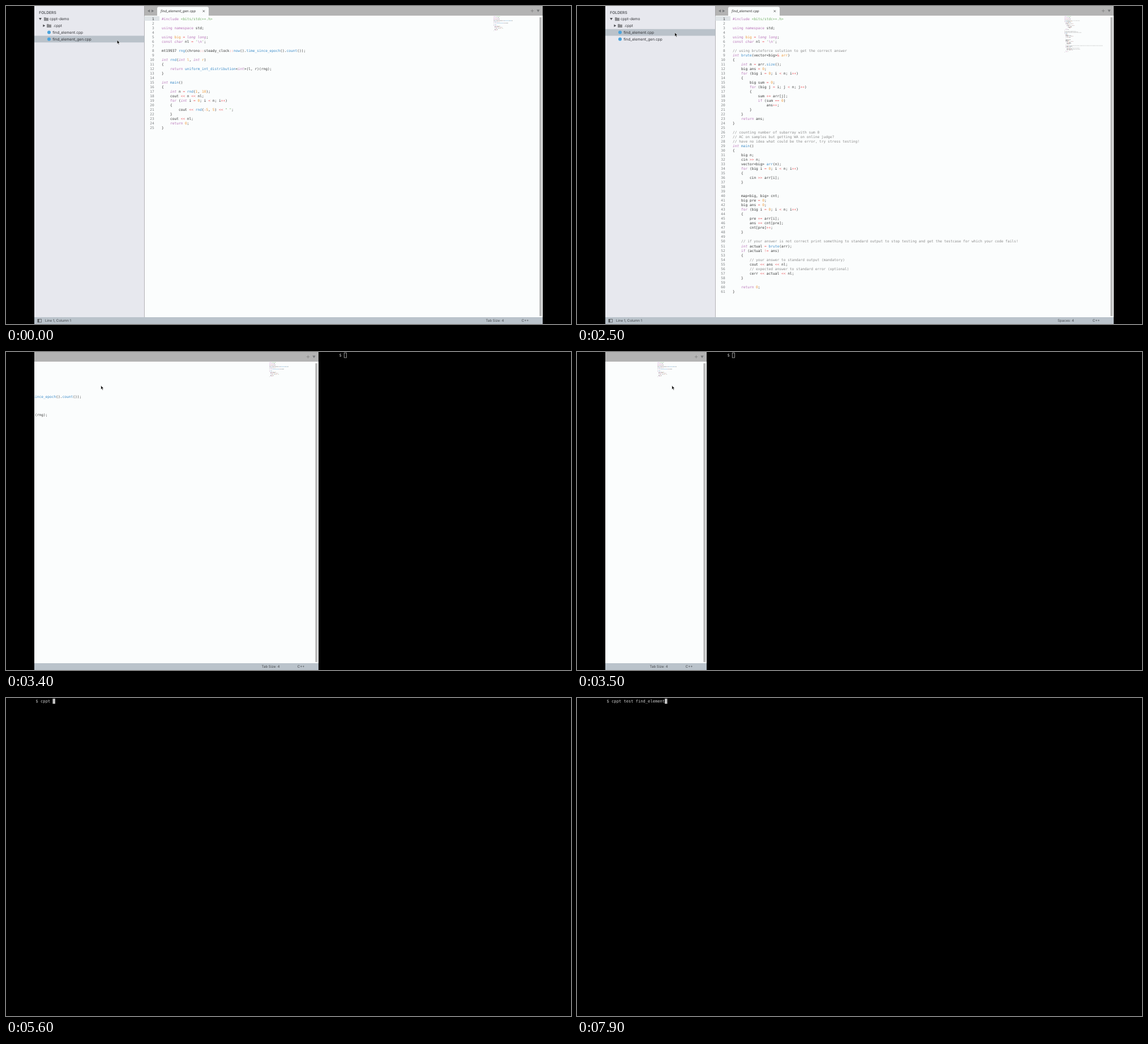
Recreate the animation shown at these times as an HTML page with a canvas. Size 998x561 px, loop 8 s.

```html
<!DOCTYPE html>
<html lang="en">
<head>
<meta charset="utf-8">
<title>Editor and terminal</title>
<style>
html, body { margin: 0; width: 100%; height: 100%; overflow: hidden; background: #000; }
canvas { display: block; width: 998px; height: 561px; }
</style>
</head>
<body>
<canvas id="stage"></canvas>
<script>
const W = 998, H = 561, LOOP = 8000, STEP = 100;
const LEFT = 50, RIGHT = 948, SPACING = 932;
const MONO = '"DejaVu Sans Mono", monospace';
const SANS = 'Inter, sans-serif';
const ADVANCE = 0.602;

const HEAD = String.raw`#include <bits/stdc++.h>

using namespace std;

using big = long long;
const char nl = '\n';

`;

const GEN = HEAD + String.raw`mt19937 rng(chrono::steady_clock::now().time_since_epoch().count());

int rnd(int l, int r)
{
    return uniform_int_distribution<int>(l, r)(rng);
}

int main()
{
    int n = rnd(1, 10);
    cout << n << nl;
    for (int i = 0; i < n; i++)
    {
        cout << rnd(-5, 5) << " ";
    }
    cout << nl;
    return 0;
}`;

const SOLUTION = HEAD + String.raw`// using bruteforce solution to get the correct answer
int brute(vector<big>& arr)
{
    int n = arr.size();
    big ans = 0;
    for (big i = 0; i < n; i++)
    {
        big sum = 0;
        for (big j = i; j < n; j++)
        {
            sum += arr[j];
            if (sum == 0)
                ans++;
        }
    }
    return ans;
}

// counting number of subarray with sum 0
// AC on samples but getting WA on online judge?
// have no idea what could be the error, try stress testing!
int main()
{
    big n;
    cin >> n;
    vector<big> arr(n);
    for (big i = 0; i < n; i++)
    {
        cin >> arr[i];
    }


    map<big, big> cnt;
    big pre = 0;
    big ans = 0;
    for (big i = 0; i < n; i++)
    {
        pre += arr[i];
        ans += cnt[pre];
        cnt[pre]++;
    }

    // if your answer is not correct print something to standard output to stop testing and get the testcase for which your code fails!
    int actual = brute(arr);
    if (actual != ans)
    {
        // your answer to standard output (mandatory)
        cout << ans << nl;
        // expected answer to standard error (optional)
        cerr << actual << nl;
    }

    return 0;
}`;

const COLORS = {
  plain: '#333333', comment: '#8b8b8b', string: '#6fae62', keyword: '#b873b8',
  type: '#b873b8', number: '#ee9a3c', name: '#ee9a3c', op: '#ee6368', call: '#3b8bc8'
};

const RULES = [
  ['comment', /\/\/.*/y],
  ['string', /<bits[^>]*>|" "|'/y],
  ['keyword', /#include|\\n|\b(?:using|namespace|const|return|for|if)\b/y],
  ['type', /\b(?:int|char|long)\b/y],
  ['name', /(?<=using )big\b|(?<=^int \w+\(.*[ &])\w+(?=[,)])/y],
  ['call', /\b[a-z]\w*(?=\(|<int>\()/y],
  ['number', /\b\d+\b/y],
  ['op', /<<|>>|\+\+|[+!=]=|::|&|-(?=\d)|(?<= )[<=](?= )/y],
  ['plain', /\w+|[^\w\s]/y]
];

function tokenize(line) {
  const tokens = [];
  let at = 0;
  while (at < line.length) {
    let size = 1;
    for (const [kind, rule] of RULES) {
      rule.lastIndex = at;
      const hit = rule.exec(line);
      if (hit) {
        tokens.push({ kind, at, text: hit[0] });
        size = hit[0].length;
        break;
      }
    }
    at += size;
  }
  return tokens;
}

const makeFile = (name, code, indent, row) =>
  ({ name, indent, row, lines: code.split('\n').map(tokenize) });
const solution = makeFile('find_element.cpp', SOLUTION, 'Spaces: 4', 2);
const generator = makeFile('find_element_gen.cpp', GEN, 'Tab Size: 4', 3);

const canvas = document.getElementById('stage');
const ctx = canvas.getContext('2d');
const ratio = window.devicePixelRatio || 1;
canvas.width = W * ratio;
canvas.height = H * ratio;
ctx.scale(ratio, ratio);
ctx.textRendering = 'geometricPrecision';

function rect(x, y, w, h, color) {
  ctx.fillStyle = color;
  ctx.fillRect(x, y, w, h);
}

function text(str, x, y, font, color, align = 'left') {
  ctx.font = font;
  ctx.fillStyle = color;
  ctx.textAlign = align;
  ctx.fillText(str, x, y);
}

function poly(points, color) {
  ctx.beginPath();
  points.forEach(([x, y]) => ctx.lineTo(x, y));
  ctx.closePath();
  ctx.fillStyle = color;
  ctx.fill();
}

function strokes(color, width, ...lines) {
  ctx.beginPath();
  for (const [x1, y1, x2, y2] of lines) {
    ctx.moveTo(x1, y1);
    ctx.lineTo(x2, y2);
  }
  ctx.strokeStyle = color;
  ctx.lineWidth = width;
  ctx.stroke();
}

const sideways = (x, y, r, dir, color) =>
  poly([[x - r * dir, y - r * 1.2], [x + r * dir, y], [x - r * dir, y + r * 1.2]], color);
const downward = (x, y, r, color) =>
  poly([[x - r * 1.2, y - r], [x + r * 1.2, y - r], [x, y + r]], color);

function folder(x, y) {
  rect(x, y - 3, 3.5, 2, '#8b8c90');
  rect(x, y - 2.1, 8, 5.3, '#8b8c90');
}

function drawSidebar(file) {
  rect(LEFT, 0, 194.5, 549, '#e7e8ee');
  const rowY = i => 23 + i * 11.8;
  rect(LEFT, rowY(file.row) - 5.9, 194.5, 11.8, '#bac2ca');
  text('FOLDERS', 58.3, 13.8, `600 6.7px ${SANS}`, '#55575c');
  downward(60.5, rowY(0), 2, '#4a4b4f');
  folder(67, rowY(0));
  sideways(67.3, rowY(1), 1.9, 1, '#4a4b4f');
  folder(72, rowY(1));
  const font = `6.6px ${SANS}`;
  text('cppt-demo', 77, rowY(0) + 2.3, font, '#333438');
  text('.cppt', 83, rowY(1) + 2.3, font, '#333438');
  for (const { name, row } of [solution, generator]) {
    ctx.beginPath();
    ctx.arc(76, rowY(row), 3, 0, Math.PI * 2);
    ctx.fillStyle = '#4ba3dc';
    ctx.fill();
    text(name, 82.3, rowY(row) + 2.3, font, '#333438');
  }
}

function drawTabs(file) {
  rect(244.5, 0, RIGHT - 244.5, 17, '#b3b3b3');
  sideways(252, 8.7, 2.1, -1, '#77797b');
  sideways(259.2, 8.7, 2.1, 1, '#77797b');
  ctx.beginPath();
  ctx.roundRect(267, 1.5, 91, 16, [3, 3, 0, 0]);
  ctx.fillStyle = '#fafcfc';
  ctx.fill();
  text(file.name, 273, 11.2, `italic 6px ${SANS}`, '#333333');
  strokes('#555555', 0.9, [347.6, 7.4, 351, 10.8], [351, 7.4, 347.6, 10.8]);
  strokes('#858585', 0.9, [926.8, 8.5, 932.2, 8.5], [929.5, 5.8, 929.5, 11.2]);
  downward(940, 8.6, 2.2, '#747678');
}

function drawCode(file) {
  const size = 6.21, pitch = 8.02, mini = 1.05;
  rect(244.5, 17, RIGHT - 244.5, 532, '#fbfdfd');
  rect(244.5, 18, 26.5, 8, '#dfe4e7');
  file.lines.forEach((tokens, i) => {
    const y = 24.5 + i * pitch;
    text(i + 1, 261.7, y, `${size}px ${MONO}`, i ? '#7d8083' : '#333333', 'right');
    for (const { kind, at, text: str } of tokens) {
      const style = kind === 'type' ? 'italic ' : '';
      text(str, 275 + at * size * ADVANCE, y, `${style}${size}px ${MONO}`, COLORS[kind]);
      ctx.globalAlpha = 0.5;
      for (const word of str.matchAll(/\S+/g)) {
        rect(861 + (at + word.index) / 2, 18.2 + i * mini, word[0].length / 2, 0.7, COLORS[kind]);
      }
      ctx.globalAlpha = 1;
    }
  });
  rect(942.3, 20, 4, 527, '#bababa');
}

function drawStatus(file) {
  const font = `6.1px ${SANS}`;
  rect(LEFT, 549, RIGHT - LEFT, 12, '#bac3cb');
  ctx.strokeStyle = '#56595d';
  ctx.lineWidth = 0.8;
  ctx.strokeRect(56, 552.5, 6.5, 5.5);
  rect(56, 552.5, 2.4, 5.5, '#56595d');
  text('Line 1, Column 1', 69, 557.4, font, '#44474b');
  text(file.indent, 863.5, 557.4, font, '#44474b', 'center');
  text('C++', 917, 557.4, font, '#44474b', 'center');
}

function drawEditor(file) {
  drawTabs(file);
  drawCode(file);
  drawSidebar(file);
  drawStatus(file);
}

const COMMAND = 'cppt test find_element';
const KEYS = [4700, 5000, 5200, 5300, 5600, 5800, 6000, 6300, 6400, 6500, 7200, 7400, 7500, 7600];
const COMPLETE = 7900, FOCUS = 4000;

function drawTerminal(t) {
  const size = 7.09, advance = size * ADVANCE;
  const count = t >= COMPLETE ? COMMAND.length : KEYS.filter(k => k <= t).length;
  const font = `${size}px ${MONO}`;
  text('$', 52.6, 8.2, font, '#c7c7c7');
  [...COMMAND.slice(0, count)].forEach((c, i) =>
    text(c, 61.1 + i * advance, 8.2, font, '#d0d0d0'));
  const x = 61.1 + count * advance;
  if (t >= FOCUS) {
    rect(x, 1.2, advance + 0.2, 9, '#c4c4c4');
  } else {
    ctx.strokeStyle = '#b4b4b4';
    ctx.lineWidth = 0.8;
    ctx.strokeRect(x + 0.2, 1.6, advance, 8.4);
  }
}

const ease = p => p * p * (3 - 2 * p);
const progress = (t, from, to) => ease(Math.min(1, Math.max(0, (t - from) / (to - from))));

function drawPointer(t) {
  if (t >= KEYS[0]) return;
  ctx.save();
  if (t >= FOCUS) {
    ctx.translate(167.9, 59.3);
    const beam = [[0, -3.5, 0, 3.5], [-2, -4, 2, -4], [-2, 4, 2, 4]];
    strokes('#d8d8d8', 1.5, ...beam);
    strokes('#333333', 0.4, beam[0]);
  } else {
    const up = progress(t, 300, 900), down = progress(t, 3000, 3200);
    ctx.translate(196.3 - 23.5 * up - 5 * down, 60 - 13.2 * up + 12.4 * down);
    poly([[0, 0], [0, 6.8], [1.5, 5.4], [2.6, 8], [3.7, 7.5], [2.6, 5], [4.6, 5]], '#000000');
    ctx.strokeStyle = '#ffffff';
    ctx.lineWidth = 0.5;
    ctx.stroke();
  }
  ctx.restore();
}

function slide(t) {
  if (t < 3400) return 0;
  if (t >= FOCUS) return SPACING;
  return Math.round(SPACING * (1 - 0.575 * 0.398 ** ((t - 3400) / 100)));
}

function draw(t) {
  rect(0, 0, W, H, '#000000');
  const shift = slide(t);
  ctx.save();
  ctx.beginPath();
  ctx.rect(LEFT, 0, RIGHT - LEFT, H);
  ctx.clip();
  ctx.translate(-shift, 0);
  if (shift < SPACING) drawEditor(t >= 1400 && t < 3100 ? solution : generator);
  ctx.translate(SPACING, 0);
  if (shift > 0) drawTerminal(t);
  ctx.restore();
  drawPointer(t);
}

const start = performance.now();
let shown = -1;
function tick() {
  const t = Math.floor(((performance.now() - start) % LOOP) / STEP) * STEP;
  if (t !== shown) draw(shown = t);
  requestAnimationFrame(tick);
}
tick();
</script>
</body>
</html>
```
